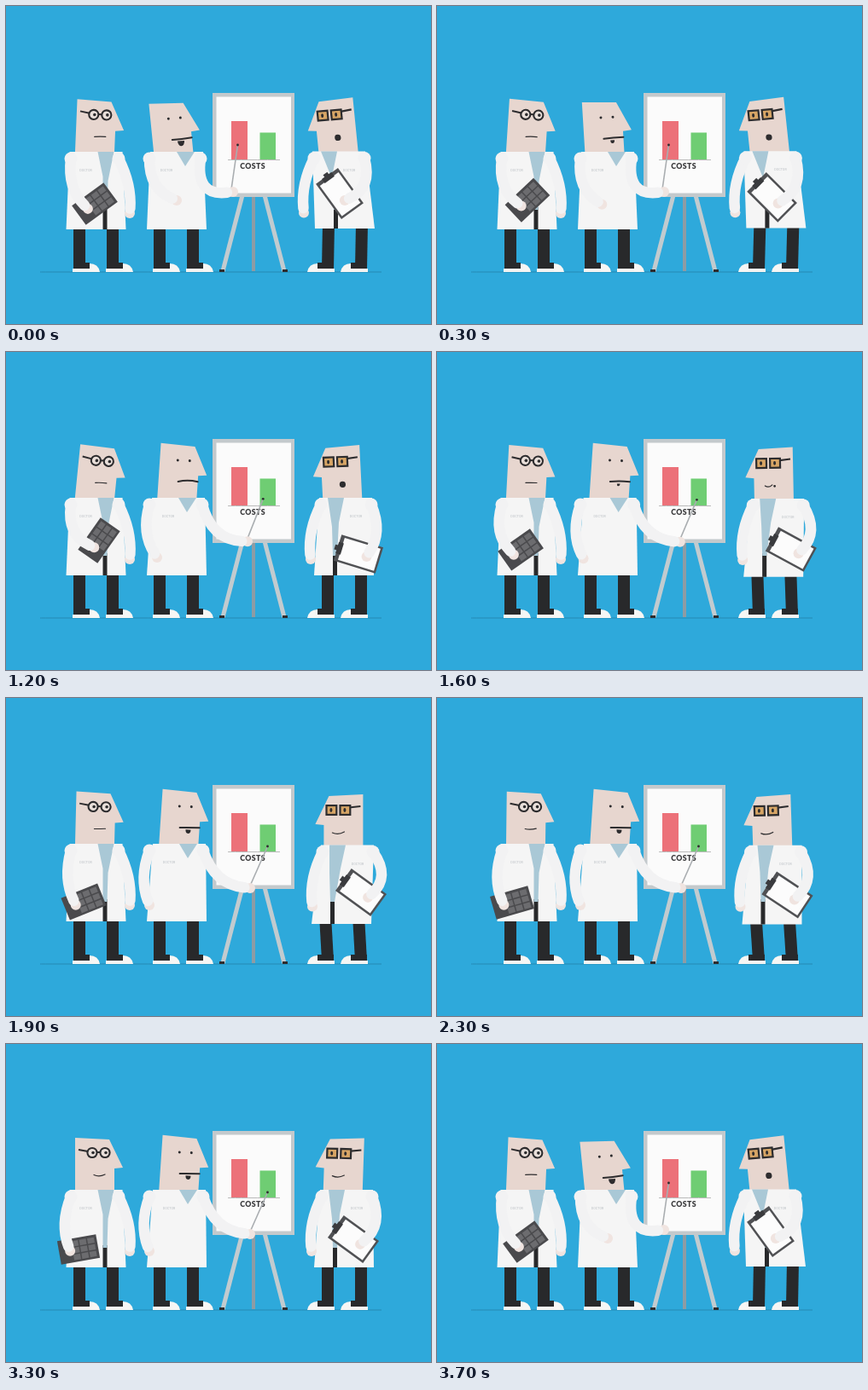
An HTML page with a canvas that plays this animation: 498 by 373 pixels, repeating every 3.8 s.

```html
<!DOCTYPE html>
<html lang="en">
<head>
<meta charset="utf-8">
<title>Costs</title>
<style>
html, body { margin: 0; width: 100%; height: 100%; overflow: hidden; background: #2ea9db; }
canvas { display: block; width: 498px; height: 373px; }
</style>
</head>
<body>
<canvas id="stage"></canvas>
<script>
const W = 498, H = 373, LOOP = 3800, STEP = 100, LAST = LOOP - STEP;
const BLUE = '#2ea9db', SKIN = '#e7d6cf', HAND = '#f0e4e0', COAT = '#f5f5f5',
      SLEEVE = '#f2f2f3', SHIRT = '#a9c8d6', DARK = '#2d2c2e', PANTS = '#28292b';

const canvas = document.getElementById('stage');
const c = canvas.getContext('2d');
const ratio = window.devicePixelRatio || 1;
canvas.width = W * ratio;
canvas.height = H * ratio;

const mix = (a, b, k) => a + (b - a) * k;

// Rows are [time, ...values]; the last row eases back into the first.
function pose(t, rows) {
  const all = [...rows, [LAST, ...rows[0].slice(1)]];
  const i = Math.max(1, all.findIndex(r => r[0] >= t));
  const [t0, ...a] = all[i - 1], [t1, ...b] = all[i];
  const u = (t - t0) / (t1 - t0), k = u * u * (3 - 2 * u);
  return a.map((v, j) => mix(v, b[j], k));
}

function poly(p, fill) {
  c.beginPath();
  for (let i = 0; i < p.length; i += 2) c.lineTo(p[i], p[i + 1]);
  c.fillStyle = fill;
  c.fill();
}

function rect(x, y, w, h, fill) {
  c.fillStyle = fill;
  c.fillRect(x, y, w, h);
}

function dot(x, y, rx, fill, ry = rx, end = 2 * Math.PI) {
  c.beginPath();
  c.ellipse(x, y, rx, ry, 0, 0, end);
  c.fillStyle = fill;
  c.fill();
}

function curve(x1, y1, cx, cy, x2, y2, width, color, cap = 'round') {
  c.beginPath();
  c.moveTo(x1, y1);
  c.quadraticCurveTo(cx, cy, x2, y2);
  c.lineWidth = width;
  c.lineCap = cap;
  c.strokeStyle = color;
  c.stroke();
}

function line(x1, y1, x2, y2, width, color) {
  curve(x1, y1, x1, y1, x2, y2, width, color, 'butt');
}

function text(s, x, y, font, fill) {
  c.font = font;
  c.fillStyle = fill;
  c.textAlign = 'center';
  c.fillText(s, x, y);
}

function within(matrix, draw) {
  c.save();
  c.transform(...matrix);
  draw();
  c.restore();
}

function leg(x, dir, hip = 0) {
  within([dir, 0, 0, 1, x, 0], () => {
    const top = dir * hip;
    poly([top, 255, top + 14, 255, 14, 308, 0, 308], PANTS);
    rect(0, 301, 19, 7, PANTS);
    c.beginPath();
    c.moveTo(-1, 308);
    c.lineTo(19, 308);
    c.lineTo(19, 302);
    c.quadraticCurveTo(29, 302, 31, 312);
    c.lineTo(-1, 312);
    c.fillStyle = '#f6f6f4';
    c.fill();
  });
}

// The head shears about the neck; the face is drawn in the same space.
function head(x, y, lean, dir, face) {
  within([dir, .013 * lean, -dir * lean / 60, 1, x, y], () => {
    poly([-23, -61, 17, -59, 33, -26, 23, -25, 23, 4, -23, 4], SKIN);
    face();
  });
}

function coat(x, dir, open, shift = 0, drop = 0) {
  within([dir, 0, 0, 1, x, 0], () => {
    const s = dir * shift, hip = -dir * drop, top = 171 + drop / 2, hem = 262 + drop;
    poly([s - 31, top, s + 31, top, hip + 35, hem, hip - 35, hem], COAT);
    if (open) {
      rect(hip + 8, 236, 5, hem - 236, PANTS);
      poly([s + 2, top, s + 21, top, hip + 14, 205, hip + 13, 239, hip + 8, 239, s + 8, 200], SHIRT);
    } else {
      poly([s, top, s + 21, top, s + 10, 188], SHIRT);
    }
  });
  text('DOCTOR', x + shift - 12 * dir, 194 + drop / 2, '3.4px Inter, sans-serif', '#b2b8bd');
}

// The elbow bends out further the closer the hand comes to the shoulder.
function arm(x1, y1, x2, y2, side, reach = 67) {
  const dx = x2 - x1, dy = y2 - y1, d = Math.hypot(dx, dy);
  const bend = side * .6 * Math.sqrt(Math.max(0, reach * reach - d * d)) / d;
  const cx = (x1 + x2) / 2 - dy * bend, cy = (y1 + y2) / 2 + dx * bend;
  dot(x2, y2, 6, HAND);
  curve(x1, y1, cx, cy, mix(x2, cx, .16), mix(y2, cy, .16), 12.5, SLEEVE);
  dot(x1, y1, 7.5, SLEEVE);
}

// A held thing, with the hand of the given shoulder resting on it.
function hold(shoulder, y, side, [hx, hy, degrees], draw) {
  const a = degrees * Math.PI / 180, cos = Math.cos(a), sin = Math.sin(a);
  within([cos, sin, -sin, cos, hx, hy], draw);
  arm(shoulder, y, hx - side * 10 * cos, hy - side * 10 * sin, side);
}

function easel() {
  line(290, 222, 290, 311, 4, '#8e9ca4');
  for (const side of [-1, 1]) {
    line(290 + 13 * side, 222, 290 + 36 * side, 311, 5, '#c2cbcf');
    rect(287 + 37 * side, 309, 6, 3, DARK);
  }
  rect(242, 102, 96, 122, '#c3c9cc');
  rect(246.5, 106.5, 87.5, 113, '#fbfbfb');
  rect(264, 135, 19, 45, '#ec7179');
  rect(297.5, 148.5, 18.5, 31.5, '#6fcd73');
  line(260, 180.5, 321, 180.5, 1, '#b9b9b9');
  c.letterSpacing = '.4px';
  text('COSTS', 289.2, 191.4, '900 8.8px Lato, sans-serif', '#3c3c3e');
  c.letterSpacing = '0px';
}

function calculator() {
  rect(-23, -14, 46, 28, '#4a4a4d');
  for (let i = 0; i < 9; i++) {
    rect(-7 + 9.5 * (i % 3), -11 + 8 * Math.floor(i / 3), 8, 6.5, '#6c6c6f');
  }
}

function clipboard() {
  rect(-25.5, -16, 51, 32, '#505154');
  rect(-21, -13.5, 44, 27, '#fcfcfc');
  rect(-26, -7, 6, 14, '#3a3b3e');
  rect(-29, -3, 4, 6, '#3a3b3e');
}

function leftMan(t) {
  const read = [6, -1, 109, 221, -55], rest = [0, 3, 85, 241, -10];
  const [lean, smile, ...held] = pose(t, [
    [0, 2.5, -1, 104, 232, -36], [700, ...read], [1200, ...read],
    [1900, 1.5, 0, 91, 239, -22], [2700, ...rest], [3300, ...rest]]);
  leg(79, 1);
  leg(118, 1);
  head(104, 171, lean, 1, () => {
    line(-19, -47, -8, -45, 2, DARK);
    line(2, -44, 7, -44, 2, DARK);
    for (const x of [-3, 12]) {
      dot(x, -43.5, 6.6, DARK);
      dot(x, -43.5, 4.5, '#e9dfda');
      dot(x + 1, -43.5, 1.8, DARK);
    }
    curve(-1, -17.5, 5, -17.5 + smile, 12, -18, 1.2, DARK);
  });
  coat(105.5, 1, true);
  arm(132, 179, 145, 243, -1);
  hold(76, 179, 1, held, calculator);
}

function middleMan(t) {
  const point = [3, 4, .75, 168, 243, 1];
  const [shift, lean, talk, hx, hy, p] = pose(t, [
    [0, 0, -6, 1, 200, 228, 0], [700, 0, 0, 0, 183, 240, 0], [1200, 2, 4, 0, 177, 241, .85],
    [1900, ...point], [2700, ...point], [3300, ...point]]);
  leg(173, 1);
  leg(212, 1);
  head(196.5 + 2 * shift, 171 - lean / 2, lean, 1, () => {
    dot(-2, -42, 1.5, DARK);
    dot(12, -42, 1.5, DARK);
    curve(0, -17, 11, -20 + 3 * talk, 23, -18, 2, DARK);
    dot(10, -15, 4 * talk, DARK, 6 * talk, Math.PI);
  });
  coat(200, 1, false, shift);
  arm(168, 179, hx, hy, 1);
  const x = mix(266, 286, p), y = mix(218, 223, p);
  const tipX = mix(271.5, 306.5, p), tipY = mix(163, 174, p);
  line(x - 3, y + 4, tipX, tipY, 1.6, '#a9adb0');
  dot(tipX, tipY, 1.4, DARK);
  arm(228 + shift, 179, x, y, 1, 80);
}

function rightMan(t) {
  const [shift, lean, drop, smile, ...held] = pose(t, [
    [0, -6, 6, -1, 0, 391, 220, 54], [700, -5, 7, -2, 0, 395, 231, 31],
    [1200, 2, 3, 0, 0, 413, 237, 17], [1900, 4, 0, 3, 1, 416, 228, 36],
    [2700, -3, 4, 4, 1, 405, 234, 31], [3300, 3, -2, 0, 1, 407, 229, 36]]);
  const y = 179 + drop / 2;
  leg(384, -1, -drop);
  leg(423, -1, -drop);
  head(393 + .6 * shift, 171 + drop, lean, -1, () => {
    line(-2, -45, -20, -47, 2.2, DARK);
    for (const x of [-2, 14]) {
      rect(x - 7, -49, 14, 13, DARK);
      rect(x - 4.8, -46.8, 9.6, 8.6, '#d7a565');
      dot(x + .5, -42.5, 1.5, DARK, 2.4);
    }
    dot(-1, -15.5, 3.6 * (1 - smile), DARK);
    if (smile > .3) curve(6 - 7 * smile, -17, 6, -13, 6 + 7 * smile, -16, 1.2, DARK);
  });
  coat(396, -1, true, shift, drop);
  arm(367 + shift, y, 355 + shift, y + 64, 1);
  hold(426 + shift, y, -1, held, clipboard);
}

function frame(now) {
  const t = Math.floor(now % LOOP / STEP) * STEP;
  c.setTransform(ratio, 0, 0, ratio, 0, 0);
  rect(0, 0, W, H, BLUE);
  line(40, 312, 440, 312, 1, '#2489b3');
  easel();
  leftMan(t);
  middleMan(t);
  rightMan(t);
}

const start = performance.now();
function tick() {
  frame(performance.now() - start);
  requestAnimationFrame(tick);
}
tick();
</script>
</body>
</html>
```
